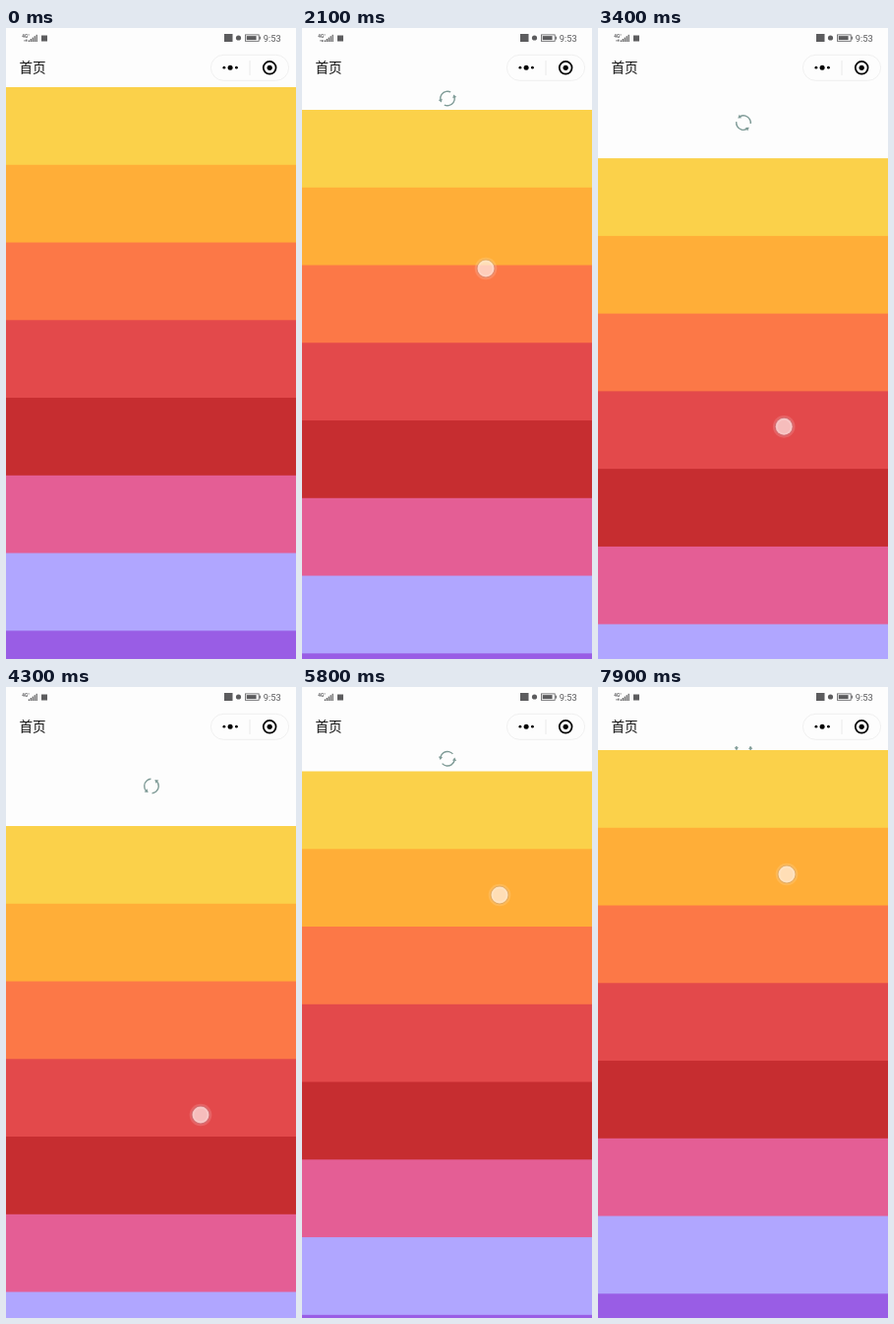
An HTML page with a canvas that plays this animation: 295 px wide and 640 px high, repeating every 8000 ms.

```html
<!DOCTYPE html>
<html lang="zh">
<head>
<meta charset="utf-8">
<title>Pull to refresh</title>
<style>
html, body { margin: 0; width: 100%; height: 100%; overflow: hidden; background: #fdfdfd; }
canvas { display: block; width: 295px; height: 640px; }
</style>
</head>
<body>
<canvas id="stage"></canvas>
<script>
const W = 295, H = 640, LOOP = 8000, STEP = 100;
const TOP = 60, BAND = 78.76;
const BANDS = ['#fbd14a', '#ffae38', '#fc7847', '#e3494b', '#c62d30', '#e45e95', '#b0a6ff', '#995de5'];
const INK = '#5c5c5e';

// Each track is a list of [ms, value].
const PULL = [[1500, 0], [1600, 2.5], [2100, 23], [2300, 30], [3000, 55], [3200, 65], [3600, 77],
  [4100, 82], [4200, 82], [4300, 81], [5100, 51], [5800, 25.5], [6000, 18.5], [6900, 3],
  [7300, 0], [7700, 0], [7800, 1], [7900, 4]];
const DRAG_X = [[1500, 187], [3000, 187], [4300, 198], [5800, 201], [6900, 209]];
const DRAG_Y = [[1500, 150], [2100, 244], [3000, 364], [3700, 425], [4100, 437], [4200, 437],
  [4300, 434], [5800, 211], [6900, 125]];
const NEXT_Y = [[7800, 176], [7900, 190]];

const canvas = document.getElementById('stage');
const ctx = canvas.getContext('2d');
const dpr = window.devicePixelRatio || 1;
canvas.width = W * dpr;
canvas.height = H * dpr;

// Monotone cubic interpolation along a track.
function sample(track, t) {
  const last = track.length - 1;
  if (t <= track[0][0]) return track[0][1];
  if (t >= track[last][0]) return track[last][1];
  const rate = i => (track[i + 1][1] - track[i][1]) / (track[i + 1][0] - track[i][0]);
  const slope = i => {
    if (i === 0) return rate(0);
    if (i === last) return rate(last - 1);
    const a = rate(i - 1), b = rate(i);
    return a * b > 0 ? 2 * a * b / (a + b) : 0;
  };
  let i = 0;
  while (t > track[i + 1][0]) i++;
  const [t0, v0] = track[i], [t1, v1] = track[i + 1];
  const d = t1 - t0, u = (t - t0) / d, w = 1 - u;
  return w * w * (1 + 2 * u) * v0 + u * u * (3 - 2 * u) * v1
    + d * u * w * (w * slope(i) - u * slope(i + 1));
}

function rect(x, y, w, h, color) {
  ctx.fillStyle = color;
  ctx.fillRect(x, y, w, h);
}

function disc(x, y, r, color) {
  ctx.fillStyle = color;
  ctx.beginPath();
  ctx.arc(x, y, r, 0, Math.PI * 2);
  ctx.fill();
}

function ring(x, y, r, width, color) {
  ctx.strokeStyle = color;
  ctx.lineWidth = width;
  ctx.beginPath();
  ctx.arc(x, y, r, 0, Math.PI * 2);
  ctx.stroke();
}

function label(text, x, y, font, color) {
  ctx.font = font;
  ctx.fillStyle = color;
  ctx.fillText(text, x, y);
}

function drawStatus(t) {
  label('4G', 16.3, 9.6, '700 4.6px Roboto, sans-serif', INK);
  rect(22.4, 6.6, 1.4, 0.7, INK);
  const beat = Math.floor(t / 500) % 3;
  if (beat < 2) {
    rect(18.4, 12, 1.2, 1.6, '#88888a');
    rect(20.2, 11.6 + beat * 0.5, 1.3, 2, INK);
  }
  for (let i = 0; i < 5; i++) {
    const h = 1.6 + i * 1.4;
    rect(22.8 + i * 1.95, 14 - h, 1.2, h, INK);
  }
  rect(36, 7.5, 6, 6, INK);
  rect(222, 6, 8.5, 8, INK);
  disc(236.5, 10, 2.6, INK);
  ctx.strokeStyle = INK;
  ctx.lineWidth = 0.8;
  ctx.strokeRect(243.4, 6.9, 13.8, 6.4);
  rect(244.7, 8.1, 9.9, 4, INK);
  rect(257.8, 8.6, 1.1, 3, INK);
  label('9:53', 261.8, 13.7, '9.4px Roboto, sans-serif', INK);
}

function drawHeader(t) {
  rect(0, 0, W, TOP, '#fdfdfd');
  drawStatus(t);
  label('首页', 13.4, 45.4, '500 13.6px "Noto Sans CJK SC", "Noto Sans CJK", sans-serif', '#111');
  ctx.strokeStyle = '#ececec';
  ctx.lineWidth = 0.8;
  ctx.beginPath();
  ctx.roundRect(208.4, 27.3, 79.2, 26, 13);
  ctx.stroke();
  rect(247.6, 33, 0.8, 15, '#e4e4e4');
  disc(221.9, 40.2, 1.4, '#000');
  disc(228.1, 40.2, 2.5, '#000');
  disc(234.4, 40.2, 1.4, '#000');
  ring(268.2, 40.3, 6.4, 1.7, '#000');
  disc(268.2, 40.3, 2.6, '#000');
}

function drawSpinner(pull) {
  const color = '#7f9b97', r = 7.3;
  ctx.save();
  ctx.beginPath();
  ctx.rect(0, TOP, W, pull);
  ctx.clip();
  ctx.translate(148, TOP + pull / 2);
  // One full turn for every 50 units of a 360-unit-wide screen.
  ctx.rotate((pull * 360 / W / 50 * 360 - 38) * Math.PI / 180);
  for (let i = 0; i < 2; i++) {
    ctx.strokeStyle = color;
    ctx.lineWidth = 1.4;
    ctx.beginPath();
    ctx.arc(0, 0, r, 0.1, 2.3);
    ctx.stroke();
    ctx.fillStyle = color;
    ctx.beginPath();
    ctx.moveTo(r - 0.2, -2.1);
    ctx.lineTo(r + 2, 1.2);
    ctx.lineTo(r - 2.2, 1.2);
    ctx.fill();
    ctx.rotate(Math.PI);
  }
  ctx.restore();
}

function drawTouch(x, y, alpha) {
  ctx.save();
  ctx.globalAlpha = alpha;
  disc(x, y, 11.3, 'rgba(255,255,255,.14)');
  ring(x, y, 9, 1, 'rgba(150,140,150,.32)');
  disc(x, y, 8.5, 'rgba(255,246,242,.62)');
  ring(x, y, 7.3, 1.5, 'rgba(255,255,255,.18)');
  ctx.restore();
}

function draw(t) {
  const pull = sample(PULL, t) * (t < 1500 ? 0 : 1);
  ctx.setTransform(dpr, 0, 0, dpr, 0, 0);
  rect(0, 0, W, H, '#fdfdfd');
  BANDS.forEach((color, i) => {
    const y = TOP + pull + i * BAND;
    rect(0, y, W, H - y, color);
  });
  if (pull > 0) drawSpinner(pull);
  drawHeader(t);
  if (t >= 7800) drawTouch(192, sample(NEXT_Y, t), 1);
  else if (t >= 1500 && t < 7100) drawTouch(sample(DRAG_X, t), sample(DRAG_Y, t), t < 7000 ? 1 : 0.4);
}

const start = performance.now();
function tick() {
  const t = (performance.now() - start) % LOOP;
  draw(Math.floor(t / STEP) * STEP);
  requestAnimationFrame(tick);
}
tick();
</script>
</body>
</html>
```
